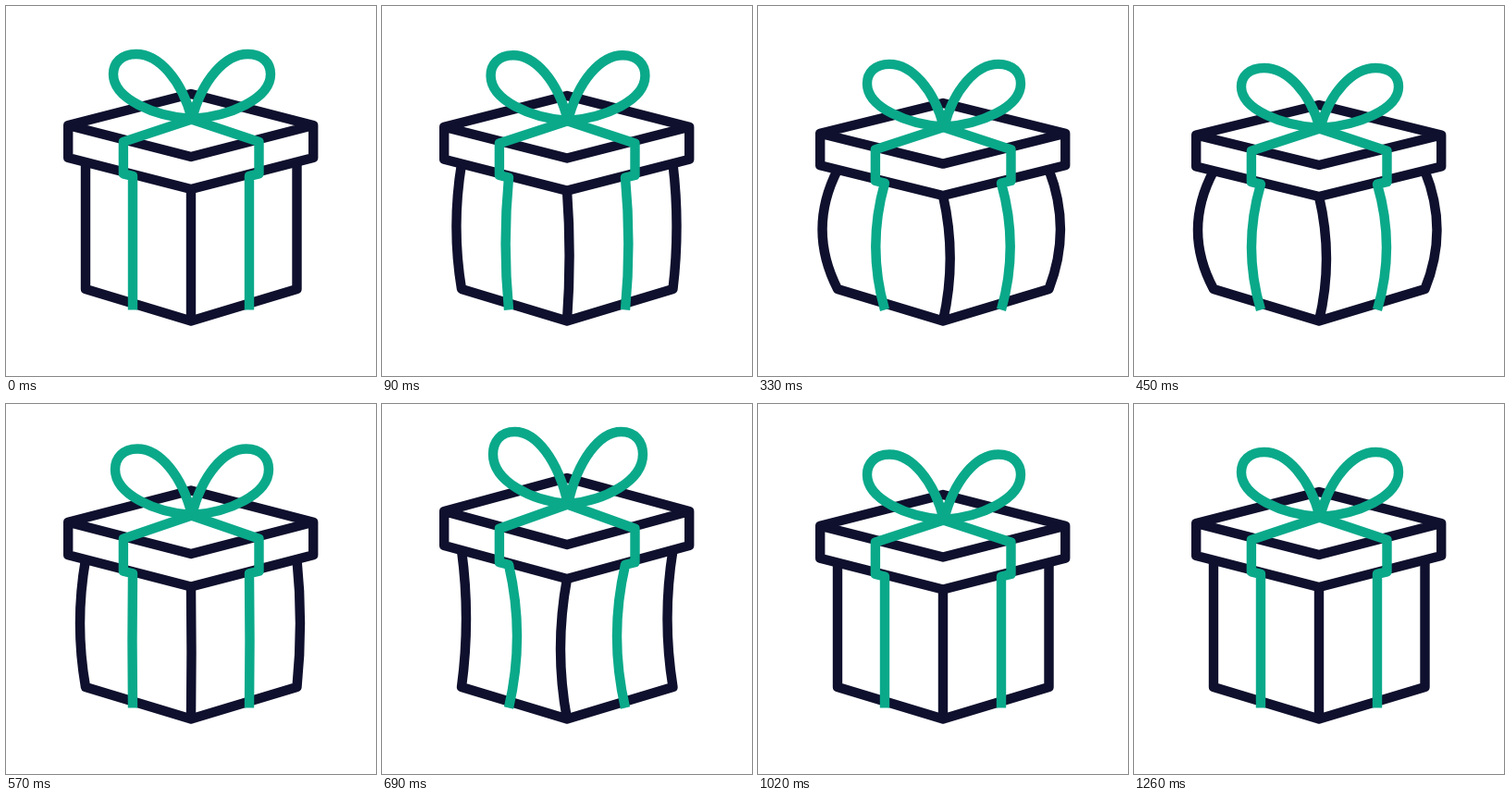
Write an HTML page that moves like this. It is 400 px wide and 400 px high and loops after 1320 ms.

```html
<!DOCTYPE html>
<html lang="en">
<head>
<meta charset="utf-8">
<title>Gift box</title>
<style>
  html, body { margin: 0; width: 100%; height: 100%; overflow: hidden; background: #fff; }
  svg { display: block; width: 100%; height: 100%; }
  path { fill: none; stroke-width: 10.4; stroke-linejoin: round; }
  .dark { stroke: #0f102d; }
  .green { stroke: #0aa98a; }
  #lid { fill: #fff; }
</style>
</head>
<body>
<svg viewBox="0 0 400 400">
  <path id="box" class="dark"/>
  <path id="lid" class="dark"/>
  <path id="ribbon" class="green"/>
  <path id="bow" class="green"/>
</svg>
<script>
const LOOP = 1320, STEP = 30, LAST = 1260;

// time, lid back / front / bottom y, knot y, bow top y, bow half width,
// bulge of the left edge, right edge, ribbons and middle edge
const KEYS = [
  [0,    95,    163,   198,   122, 52,   85, 0,  0,  0,  0],
  [210,  101.5, 168,   203,   128, 57,   81, 15, 11, 9,  7],
  [450,  107,   172,   206,   132, 67,   85, 17, 13, 10, 8],
  [690,  80,    152,   189,   108, 30,   81, -5, -6, -9, -7],
  [870,  95.5,  163,   198,   122, 50.5, 83, 0,  -1, -2, -1],
  [1020, 98,    165.5, 200.5, 125, 54.5, 83, 0,  0,  0,  0],
  [1140, 94,    162,   197.5, 121, 50.5, 85, 0,  0,  0,  0],
  [1260, 95,    163,   198,   122, 52,   85, 0,  0,  0,  0]
];

const $ = id => document.getElementById(id);
const draw = (id, d) => $(id).setAttribute('d', d);

const rate = (i, c) => (KEYS[i + 1][c] - KEYS[i][c]) / (KEYS[i + 1][0] - KEYS[i][0]);

// Monotone tangent: flat at turning points, harmonic mean elsewhere
function tangent(i, c) {
  if (i === 0 || i === KEYS.length - 1) return 0;
  const a = rate(i - 1, c), b = rate(i, c);
  return a * b > 0 ? 2 * a * b / (a + b) : 0;
}

function pose(t) {
  let i = 0;
  while (i < KEYS.length - 2 && t >= KEYS[i + 1][0]) i++;
  const p = KEYS[i], q = KEYS[i + 1], span = q[0] - p[0];
  const u = (t - p[0]) / span, v = 1 - u;
  return p.slice(1).map((a, k) => {
    const c = k + 1;
    return a * v * v * (1 + 2 * u) + q[c] * u * u * (3 - 2 * u)
      + span * u * v * (v * tangent(i, c) - u * tangent(i + 1, c));
  });
}

// Vertical edge bowed sideways by `bend` at half height
const edge = (x, y1, y2, bend) => `Q${x + 2 * bend} ${(y1 + y2) / 2} ${x} ${y2}`;

function lobe(side, knot, top, width) {
  const at = (x, y) => `${201 + side * width * x} ${knot - (knot - top) * y}`;
  return `M${at(0, 0)}C${at(.13, .6)} ${at(.42, 1)} ${at(.71, 1)}`
    + `C${at(.9, 1)} ${at(1, .86)} ${at(1, .69)}`
    + `C${at(1, .31)} ${at(.48, .04)} ${at(0, 0)}`;
}

function band(side, knot, side1, side2, slope, bend) {
  const x = 200.2 + side * 73.3, inner = 200 + side * 63;
  const drop = slope * 60 / 133, y = side2 + drop + 4.5;
  return `M200.5 ${knot + .5}L${x} ${side1 + drop + 2.5}V${side2 + drop + 2}`
    + `L${inner} ${y}` + edge(inner, y, 328.5, side * bend);
}

function render(t) {
  const [back, front, bottom, knot, top, width, left, right, ribbon, mid] = pose(t);
  const slope = (front - back) / 2, high = back + slope, low = bottom - slope;
  const start = low + 5;

  draw('box', `M86 ${start}${edge(86, start, 306, -left)}L200 340.5L314.5 306`
    + edge(314.5, 306, start, right)
    + `M200 ${bottom}${edge(200, bottom, 340.5, mid)}`);
  draw('lid', `M67.2 ${high}L200 ${back}L332.2 ${high}V${low}L200 ${bottom}L67.2 ${low}Z`
    + `M67.2 ${high}L200 ${front}L332.2 ${high}`);
  draw('ribbon', band(-1, knot, high, low, slope, ribbon) + band(1, knot, high, low, slope, ribbon));
  draw('bow', lobe(-1, knot, top, width) + lobe(1, knot, top, width));
}

function tick() {
  const t = performance.now() % LOOP;
  render(Math.min(Math.floor(t / STEP) * STEP, LAST));
  requestAnimationFrame(tick);
}
tick();
</script>
</body>
</html>
```
